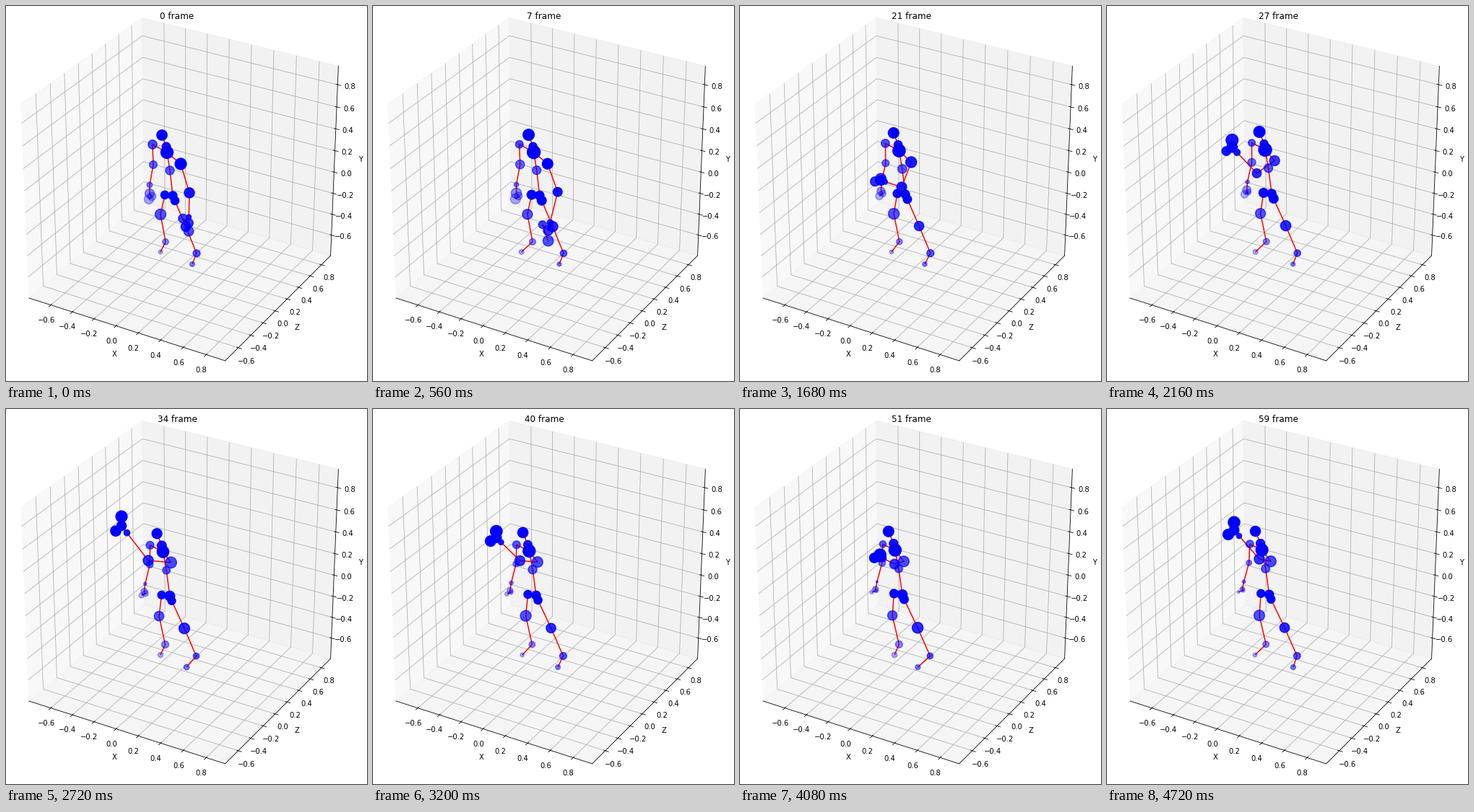
Recreate the animation shown at these times as a matplotlib script. Size 500 by 520 pixels, loop 4.8 s.

```python
import numpy as np
import matplotlib.pyplot as plt
from matplotlib.animation import FuncAnimation
from matplotlib.collections import LineCollection

WIDTH, HEIGHT, DPI = 500, 520, 72
FRAMES, INTERVAL = 60, 80
EDGE = 1.5

# Resting pose in pixels, each chain from its root to its end.
TORSO = np.array([(216, 179), (222, 195), (223, 203), (227, 228), (231, 263)])
LEFT_ARM = np.array([(203, 192), (204, 220), (199, 248),
                     (199, 260), (202, 264), (198, 268)])
LEFT_LEG = np.array([(220, 262), (214, 289), (221, 327), (214, 341)])
RIGHT_LEG = np.array([(234, 270), (249, 306), (264, 343), (258, 358)])
RIGHT_SHOULDER = np.array([242, 219])

# The waving arm: frame, elbow x and y, hand x and y.
WAVE = np.array([
    (0, 254, 259, 253, 301),
    (13, 251, 256, 229, 304),
    (21, 224, 251, 195, 242),
    (34, 197, 210, 160, 162),
    (45, 211, 214, 184, 198),
    (51, 214, 215, 194, 205),
    (59, 211, 208, 176, 168),
], dtype=float)

LEAN = np.array([-10.5, -9.5])
ARM_SWAY = np.linspace(0.5, 1.5, 6)
TORSO_SWAY = np.linspace(1, 0.6, 5)
LEG_SWAY = 0.65 * np.linspace(1, 0, 4) ** 2

TORSO_SIZE = np.array([16, 13, 18.5, 13, 14])
LEFT_ARM_SIZE = np.array([13, 13, 8, 15, 13, 15])
RIGHT_ARM_SIZE = np.array([17, 15, 9, 14, 13, 15])
LEG_SIZE = np.array([13, 15.5, 10.5, 8])

TORSO_SHADE = np.array([1, 0.92, 1, 0.64, 0.97])
LEFT_ARM_SHADE = np.geomspace(0.7, 0.32, 6)
LEFT_LEG_SHADE = np.geomspace(0.97, 0.32, 4)
RIGHT_LEG_SHADE = np.linspace(1, 0.5, 4)

# Every dot pulses a little on its own beat.
phases = np.random.default_rng(4).uniform(0, 2 * np.pi, 25)


def ease(frame, start, end):
    u = np.clip((frame - start) / (end - start), 0, 1)
    return u * u * (3 - 2 * u)


def wave_at(frame):
    """Elbow and hand on a smooth curve through the key poses."""
    t, poses = WAVE[:, 0], WAVE[:, 1:]
    slopes = np.gradient(poses, t, axis=0)
    i = min(np.searchsorted(t, frame, side="right"), len(t) - 1) - 1
    h = t[i + 1] - t[i]
    u = (frame - t[i]) / h
    rise = ease(u, 0, 1)
    pose = (poses[i] * (1 - rise) + poses[i + 1] * rise
            + h * u * (1 - u) * (slopes[i] * (1 - u) - slopes[i + 1] * u))
    return pose[:2], pose[2:]


def right_arm(frame, lean, lift):
    shoulder = RIGHT_SHOULDER + 0.5 * lean * LEAN + lift * np.array([-10, -3])
    elbow, hand = wave_at(frame)
    wrist = elbow + 0.8 * (hand - elbow)
    reach = hand[1] - elbow[1]
    thumb = hand + (-8, -0.15 * reach)
    tip = hand + (0, 0.27 * reach)
    return np.array([shoulder, elbow, wrist, hand, thumb, tip])


def sway(chain, weights, lean):
    return chain + lean * np.outer(weights, LEAN)


def pose_at(frame):
    """Chains of points, then diameter and opacity of all dots."""
    lean = ease(frame, 0, 56)
    lift = ease(frame, 13, 34)
    step = np.cos(2 * np.pi * frame / 17)

    left_leg = sway(LEFT_LEG, LEG_SWAY, lean)
    right_leg = sway(RIGHT_LEG, LEG_SWAY, lean)
    left_leg[-1, 0] -= 4.5 * (1 - step)
    right_leg[-1, 0] -= 6 * lean * (1 + step)
    chains = [sway(TORSO, TORSO_SWAY, lean),
              sway(LEFT_ARM, ARM_SWAY, lean),
              right_arm(frame, lean, lift),
              left_leg, right_leg]

    sizes = np.concatenate([
        TORSO_SIZE,
        LEFT_ARM_SIZE * (1 - lean * np.linspace(0.15, 0.6, 6)),
        RIGHT_ARM_SIZE + lift * np.linspace(-1, 3, 6),
        LEG_SIZE, LEG_SIZE])
    sizes += np.sin(2 * np.pi * 3 * frame / FRAMES + phases)

    near = np.geomspace(1, 0.68, 6) * (1 - lift)
    shades = np.concatenate([
        TORSO_SHADE, LEFT_ARM_SHADE * (1 - 0.1 * lean),
        near + np.linspace(0.7, 1.2, 6).clip(max=1) * lift,
        LEFT_LEG_SHADE, RIGHT_LEG_SHADE])
    return chains, sizes, shades.clip(0.3, 1)


plt.rcParams["font.family"] = "DejaVu Sans"
fig = plt.figure(figsize=(WIDTH / DPI, HEIGHT / DPI), dpi=DPI,
                 facecolor="white")

# The box is a little wider than high and overhangs the figure.
box = (-42 / WIDTH, -5.3 / HEIGHT, 557.1 / WIDTH, 544.5 / HEIGHT)
room = fig.add_axes(box, projection="3d")
room.apply_aspect = lambda position=None: None
room.set_box_aspect((1, 1, 1), zoom=0.9467)
room.view_init(elev=30, azim=-60)
ticks = np.arange(-3, 5) / 5
room.set(xlim=(-0.805, 0.965), ylim=(-0.805, 0.965), zlim=(-0.8, 0.965),
         xticks=ticks, yticks=ticks, zticks=ticks,
         xlabel="X", ylabel="Z", zlabel="Y")

stage = fig.add_axes((0, 0, 1, 1))
stage.set(xlim=(0, WIDTH), ylim=(HEIGHT, 0))
stage.axis("off")
title = stage.text(237, 18.5, "", fontsize=12, ha="center", va="baseline")
limbs = LineCollection([], colors="red", linewidths=1.5, zorder=2)
stage.add_collection(limbs, autolim=False)
dots = stage.scatter([], [], linewidths=EDGE, zorder=3)


def draw(frame):
    chains, sizes, shades = pose_at(frame)
    torso, *rest = chains
    chest, base = torso[2], torso[-1]
    roots = (chest, chest, base, base)
    limbs.set_segments([torso] + [np.vstack([root, limb])
                                  for root, limb in zip(roots, rest)])

    # Fainter dots lie farther back.
    order = np.argsort(shades, kind="stable")
    colors = np.zeros((len(shades), 4))
    colors[:, 2] = 1
    colors[:, 3] = shades[order]
    dots.set_offsets(np.vstack(chains)[order])
    dots.set_sizes(np.maximum(sizes[order] - EDGE, 2) ** 2)
    dots.set_facecolor(colors)
    dots.set_edgecolor(colors)
    title.set_text(f"{frame} frame")
    return dots, limbs, title


anim = FuncAnimation(fig, draw, frames=FRAMES, interval=INTERVAL,
                     repeat=True, repeat_delay=0, blit=False)
plt.show()
```
